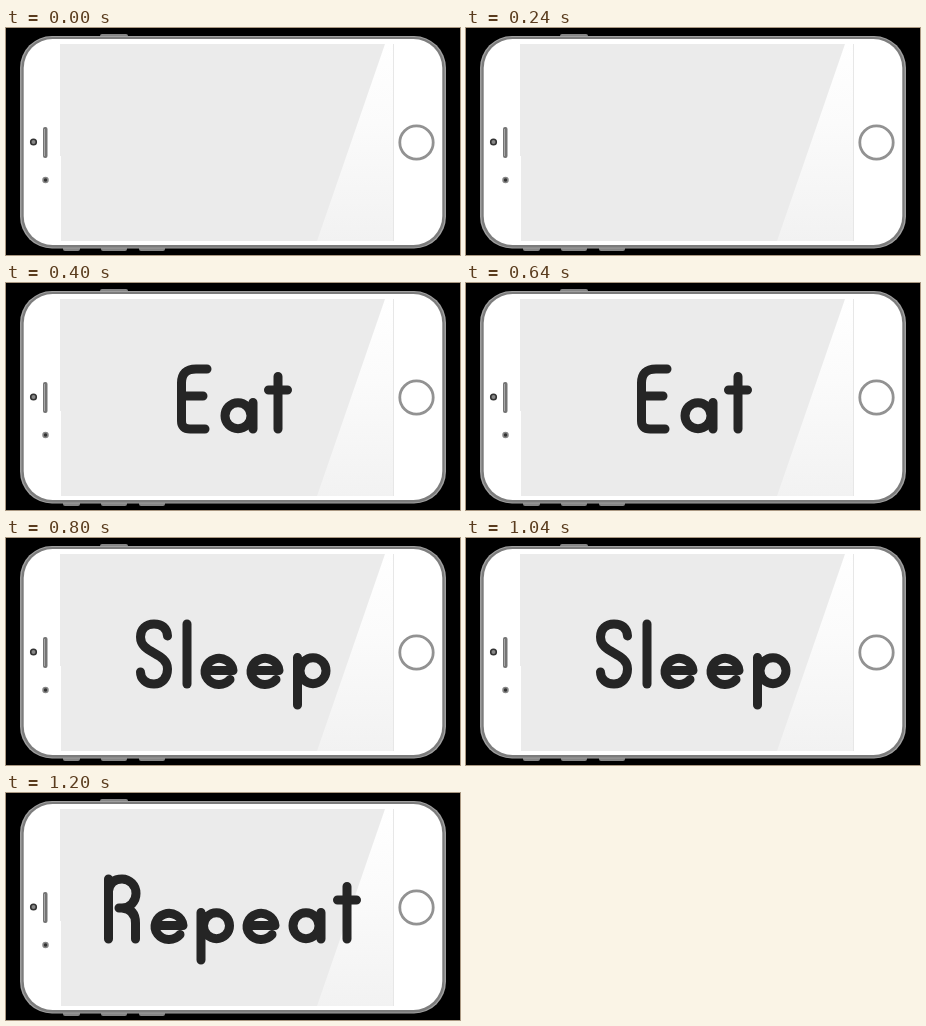
Animation, 454 px wide and 227 px high, one loop 1600 ms. Source, as an HTML page:

```html
<!DOCTYPE html>
<html lang="en">
<head>
<meta charset="utf-8">
<title>Eat, sleep, repeat</title>
<style>
  html, body { margin: 0; width: 100%; height: 100%; overflow: hidden; background: #000; }
  svg { display: block; width: 454px; height: 227px; }
  .word { fill: none; stroke: #252525; stroke-width: 9; stroke-linecap: round; stroke-linejoin: round; }
</style>
</head>
<body>
<svg viewBox="0 0 454 227">
  <defs>
    <linearGradient id="glare" x1="0" y1="0" x2="0" y2="1">
      <stop offset="0" stop-color="#fff"/>
      <stop offset=".4" stop-color="#fbfbfb"/>
      <stop offset="1" stop-color="#f2f2f2"/>
    </linearGradient>
    <!-- Letters start at x = 0; baseline strokes are centred on y = 146 -->
    <path id="E" d="M30 86H19Q4.500 86 4.500 100V138Q4.500 146 13 146H28M4.500 113H26"/>
    <path id="S" d="M31.500 98C31 90 26 86 18 86C10 86 4.500 91 4.500 99C4.500 116 31.500 114 31.500 131C31.500 140 26 146 18 146C10 146 4.500 141 4.500 134"/>
    <path id="R" d="M4.500 86V146M4.500 98Q6 86 18 86A14 14.500 0 0 1 18 115H15M18 115Q31.500 116 31.500 130V146"/>
    <path id="l" d="M4.500 86V146"/>
    <path id="e" d="M6 132.500H33A14 13 0 1 0 30 141.500"/>
    <path id="a" d="M33 119.500V146M31 132.700A13 13 0 1 0 5 132.700A13 13 0 1 0 31 132.700"/>
    <path id="p" d="M4.500 119.500V167M7 132.700A13 13 0 1 1 33 132.700A13 13 0 1 1 7 132.700"/>
    <path id="t" d="M14 93.500V146M4.500 107H23.500"/>
  </defs>

  <g fill="#858585">
    <rect x="94" y="6" width="28" height="6" rx="2"/>
    <rect x="57" y="216" width="17" height="7" rx="2"/>
    <rect x="95" y="216" width="26" height="7" rx="2"/>
    <rect x="133" y="216" width="26" height="7" rx="2"/>
  </g>
  <rect x="14" y="8" width="426" height="212.500" rx="32" fill="#a0a0a0"/>
  <rect x="15.500" y="9" width="423" height="210.500" rx="31" fill="#7c7c7c"/>
  <rect x="17.700" y="11" width="418.600" height="206" rx="29" fill="#fff"/>
  <path d="M54 16H387V213H55V128H54Z" fill="#ebebeb"/>
  <path d="M379 16H387V213H311Z" fill="url(#glare)"/>
  <path d="M387.500 16V213" stroke="#e7e7e7"/>
  <circle cx="410.500" cy="114.500" r="16.700" fill="#fff" stroke="#929292" stroke-width="2.800"/>
  <rect x="37" y="99" width="4.500" height="31" rx="2" fill="#747474"/>
  <path d="M38.500 101V128" stroke="#a8a8a8"/>
  <circle cx="27.500" cy="114" r="2.800" fill="#888" stroke="#333" stroke-width="1.600"/>
  <circle cx="39.500" cy="152" r="2.500" fill="#333" stroke="#888" stroke-width="1.500"/>
  <g class="word" id="word" role="img"></g>
</svg>
<script>
  const STEP = 400;
  const words = [
    { text: "", starts: [] },
    { text: "Eat", starts: [171, 214, 258] },
    { text: "Sleep", starts: [130, 176.5, 194, 240, 287] },
    { text: "Repeat", starts: [98, 144, 190.5, 236, 282, 327] }
  ];
  const word = document.getElementById("word");
  let shown = -1;

  function showWord({ text, starts }) {
    word.setAttribute("aria-label", text);
    word.innerHTML = starts.map((x, i) => `<use href="#${text[i]}" x="${x}"/>`).join("");
  }

  function tick() {
    const index = Math.floor(performance.now() / STEP) % words.length;
    if (index !== shown) showWord(words[shown = index]);
    requestAnimationFrame(tick);
  }
  tick();
</script>
</body>
</html>
```
